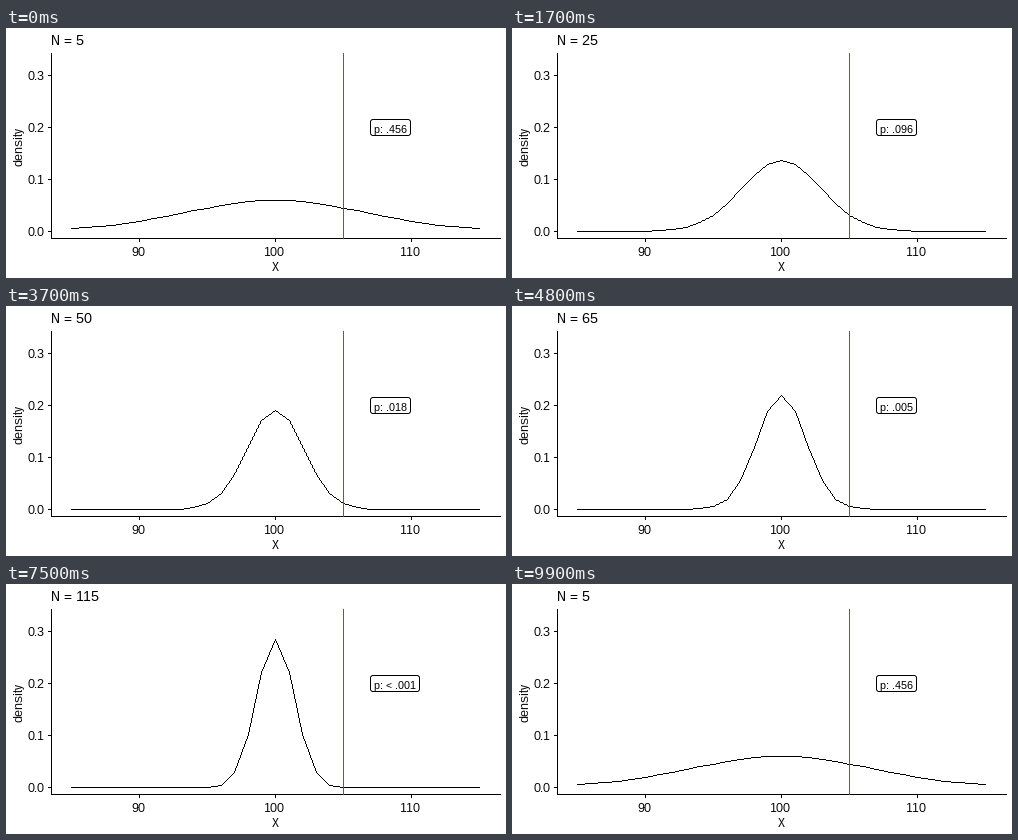
These frames come from a looping animation (500x250 px, 10 s). A matplotlib script:

```python
import math

import numpy as np
import matplotlib.pyplot as plt
from matplotlib.animation import FuncAnimation
from matplotlib.patches import FancyBboxPatch

plt.rcParams.update({
    "font.family": "Liberation Sans",
    "text.hinting": "native",
    "text.hinting_factor": 1,
    "toolbar": "None",
})

W, H, DPI = 500, 250, 72
FRAMES, INTERVAL = 100, 100
MEAN, SD, CUT = 100, 15, 105
SIZES = list(range(5, 151, 5))
LONG_STEPS = 11            # the first transitions take 3 frames, the rest 2
LEFT, TOP, RIGHT, BOTTOM = 45, 25, 494, 210
xs = np.arange(85, 116)


def px(x):
    return 269 + 13.6 * (x - 100)


def py(d):
    return 203 - 520 * d


def density(n):
    se = SD / math.sqrt(n)
    return np.exp(-0.5 * ((xs - MEAN) / se) ** 2) / (se * math.sqrt(2 * math.pi))


def p_text(n):
    z = (CUT - MEAN) / (SD / math.sqrt(n))
    p = math.erfc(z / math.sqrt(2))
    return "p: < .001" if p < 0.001 else "p: " + f"{p:.3f}"[1:]


def build_timeline():
    """List of (from, to, progress): one hold, then a linear transition."""
    steps = []
    for k, n in enumerate(SIZES):
        nxt = SIZES[(k + 1) % len(SIZES)]
        length = 3 if k < LONG_STEPS else 2
        steps.append((n, nxt, 0.0))
        steps += [(n, nxt, j / length) for j in range(1, length + 1)]
    # thin the timeline evenly to the number of frames played
    picks = np.round(np.linspace(0, len(steps) - 1, FRAMES)).astype(int)
    return [steps[i] for i in picks]


def hairline(x, y):
    """RGBA layer with a one-pixel polyline, without smoothing."""
    layer = np.zeros((H, W, 4))
    x, y = np.rint(x).astype(int), np.rint(y).astype(int)
    for x0, y0, x1, y1 in zip(x, y, x[1:], y[1:]):
        n = max(abs(x1 - x0), abs(y1 - y0)) + 1
        cols = np.rint(np.linspace(x0, x1, n)).astype(int)
        rows = np.rint(np.linspace(y0, y1, n)).astype(int)
        layer[rows, cols, 3] = 1
    return layer


timeline = build_timeline()

fig = plt.figure(figsize=(W / DPI, H / DPI), dpi=DPI, facecolor="white")
ax = fig.add_axes([0, 0, 1, 1])
ax.axis("off")
curve = ax.imshow(np.zeros((H, W, 4)), extent=(0, W, H, 0), aspect="auto",
                  interpolation="nearest", zorder=3)
ax.set_xlim(0, W)
ax.set_ylim(H, 0)


def line(x, y, color="black", **kw):
    return ax.plot(x, y, color=color, lw=1, antialiased=False, **kw)[0]


def text(x, y, s, size, ha="left", **kw):
    return ax.text(x, y, s, fontsize=size, ha=ha, va="baseline", **kw)


# axes
line([LEFT, LEFT], [TOP, BOTTOM])
line([LEFT, RIGHT], [BOTTOM, BOTTOM])
for v in (0.0, 0.1, 0.2, 0.3):
    line([LEFT - 3, LEFT], [py(v)] * 2)
    text(39, py(v) + 5, f"{v:.1f}", 12, "right")
for v in (90, 100, 110):
    line([px(v)] * 2, [BOTTOM, BOTTOM + 3])
    text(px(v) - 0.5, 228, str(v), 12, "center")
text(px(100), 243, "X", 12, "center")
text(16, 118, "density", 12, "center", rotation=90, rotation_mode="anchor")

# moving parts
line([px(CUT)] * 2, [TOP, BOTTOM], color="#a020f0", zorder=4)
box = FancyBboxPatch((364.5, 91.5), 40, 16,
                     boxstyle="round,pad=0,rounding_size=2.5",
                     fc="white", ec="black", lw=1, zorder=5)
ax.add_patch(box)
label = text(368, 105, "", 11, zorder=6)
title = text(45, 17, "", 14)


def update(i):
    a, b, t = timeline[i]
    curve.set_data(hairline(px(xs), py((1 - t) * density(a) + t * density(b))))
    s = p_text(b if t >= 0.5 else a)
    label.set_text(s)
    box.set_width(49 if "<" in s else 40)
    title.set_text(f"N = {b if t > 0.5 else a}")
    return curve, label, box, title


anim = FuncAnimation(fig, update, frames=FRAMES, interval=INTERVAL,
                     repeat=True, repeat_delay=0, blit=False)
plt.show()
```
